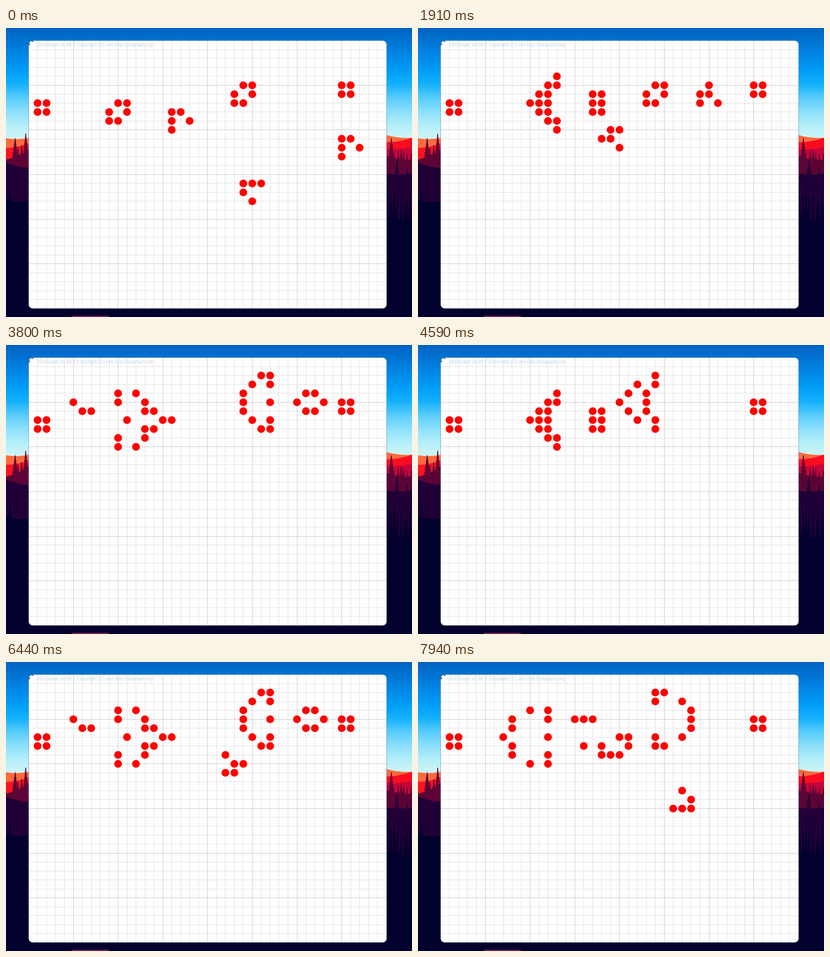
These frames come from a looping animation (886x632 px, 8 s). An HTML page with a canvas:

```html
<!DOCTYPE html>
<html lang="en">
<head>
<meta charset="utf-8">
<title>Glider gun</title>
<style>
html, body { margin: 0; width: 100%; height: 100%; overflow: hidden; background: #02002c; }
canvas { display: block; }
</style>
</head>
<body>
<canvas id="stage" width="886" height="632"></canvas>
<script>
const W = 886, H = 632, LOOP = 8000;
const BOARD = { x: 49.4, y: 27.6, w: 781.3, h: 585.6, r: 8.6 };
const CELL = 19.52, COLS = 40, ROWS = 30, DOT = 8.5;
const NAVY = '#02002c', PURPLE = '#210038', FOREST = '#5c0435';

const BLOCK = 'OO/OO', SHIP = '.OO/O.O/OO.', GLIDER = 'OO./O.O/O..', TURNED = 'OOO/O../.O.';
const SEED = [
  [BLOCK, 1, 7], [BLOCK, 35, 5], [SHIP, 9, 7], [SHIP, 23, 5],
  [GLIDER, 16, 8], [GLIDER, 35, 11], [TURNED, 24, 16]
];

// The pace wavers slightly: [ms, generation].
const PACE = [
  [0, 0], [1720, 21], [1910, 23], [2650, 31], [3070, 36], [3510, 41],
  [4340, 50], [5170, 60], [5990, 69], [7040, 81], [7940, 91], [8030, 92]
];

const ctx = document.getElementById('stage').getContext('2d');

function seedCells() {
  const cells = new Uint8Array(COLS * ROWS);
  for (const [shape, x, y] of SEED)
    shape.split('/').forEach((row, j) => [...row].forEach((ch, i) => {
      if (ch === 'O') cells[(y + j) * COLS + x + i] = 1;
    }));
  return cells;
}

function nextGeneration(cells) {
  const at = (x, y) => x >= 0 && x < COLS && y >= 0 && y < ROWS ? cells[y * COLS + x] : 0;
  return cells.map((live, k) => {
    const x = k % COLS, y = Math.floor(k / COLS);
    let n = -live;
    for (let j = -1; j <= 1; j++) for (let i = -1; i <= 1; i++) n += at(x + i, y + j);
    return n === 3 || (live && n === 2) ? 1 : 0;
  });
}

function generationAt(t) {
  const k = PACE.findIndex(([ms]) => ms > t);
  const [t0, g0] = PACE[k - 1], [t1, g1] = PACE[k];
  return Math.floor(g0 + (t - t0) / (t1 - t0) * (g1 - g0) + 1e-6);
}

function seededRandom(seed) {
  return () => (seed = (seed * 16807) % 2147483647) / 2147483647;
}

function pine(c, x, top, height, width, color) {
  const tiers = 9, step = height / tiers;
  c.fillStyle = color;
  c.beginPath();
  c.rect(x - 1, top, 2, height);
  for (let i = 0; i < tiers; i++) {
    const half = width / 2 * (i + 1.5) / tiers, y = top + i * step;
    c.moveTo(x, y - step * 0.4);
    c.lineTo(x + half, y + step * 1.2);
    c.lineTo(x - half, y + step * 1.2);
  }
  c.fill();
}

// A sloping layer from x0 to x1, reaching to the bottom of the stage.
function ridge(c, x0, x1, y0, y1, color) {
  c.fillStyle = color;
  c.beginPath();
  c.moveTo(x0, y0);
  c.quadraticCurveTo((x0 + x1) / 2, (y0 + y1) / 2 + 5, x1, y1);
  c.lineTo(x1, H);
  c.lineTo(x0, H);
  c.fill();
}

function grove(c, x0, x1, top, depth, color, seed) {
  const rnd = seededRandom(seed);
  for (let x = x0; x < x1; x += 7)
    pine(c, x + rnd() * 4, top + rnd() * depth * 0.5, depth, 11, color);
}

function paintLandscape(c) {
  const sky = c.createLinearGradient(0, 0, 0, 245);
  ['#0062c0', '#0074d4', '#0088e6', '#009cf6', '#14b0fd', '#58ccfb', '#8ee0fb', '#b4eff9', '#d2f6f4']
    .forEach((color, i, all) => sky.addColorStop(i / (all.length - 1), color));
  c.fillStyle = sky;
  c.fillRect(0, 0, W, 250);

  const left = (y0, y1, color) => ridge(c, 0, 50, y0, y1, color);
  left(241, 240, '#ff6a3c');
  left(262, 252, '#fa1420');
  left(288, 266, FOREST);
  grove(c, 26, 52, 256, 30, FOREST, 11);
  pine(c, 20, 242, 56, 22, FOREST);
  pine(c, 43, 232, 66, 20, FOREST);
  left(294, 306, PURPLE);
  left(376, 379, NAVY);
  pine(c, 9, 349, 34, 13, NAVY);

  const right = (y0, y1, color) => ridge(c, 830, W, y0, y1, color);
  right(234, 240, '#ff6a3c');
  right(250, 240, '#fa0c20');
  right(264, 260, '#c4063a');
  right(280, 288, FOREST);
  grove(c, 846, W, 266, 30, FOREST, 5);
  pine(c, 841, 242, 60, 22, FOREST);
  right(318, 318, PURPLE);
  pine(c, 853, 289, 60, 22, PURPLE);
  pine(c, 875, 306, 50, 18, PURPLE);
  right(412, 424, NAVY);
  grove(c, 832, W, 348, 76, NAVY, 23);

  c.fillStyle = '#70204e';
  c.beginPath();
  c.roundRect(141.5, 629.3, 85, 12, 5);
  c.fill();
}

function paintBoard(c) {
  const { x, y, w, h, r } = BOARD;
  c.save();
  c.beginPath();
  c.roundRect(x, y, w, h, r);
  c.fillStyle = '#fefefe';
  c.fill();
  c.clip();
  for (const major of [false, true]) {
    c.strokeStyle = major ? '#c6c6c6' : '#dfdfdf';
    c.beginPath();
    for (let i = 1; i < COLS; i++) {
      if ((i % 5 === 0) !== major) continue;
      const px = Math.floor(x + i * CELL) + 0.5, py = Math.floor(y + i * CELL) + 0.5;
      c.moveTo(px, y);
      c.lineTo(px, y + h);
      c.moveTo(x, py);
      c.lineTo(x + w, py);
    }
    c.stroke();
  }
  // tips of the two axis arrows
  c.fillStyle = '#555';
  c.fill(new Path2D('M49 38L50 31L53 37ZM54 28H60L59 31Z'));
  c.restore();
  c.strokeStyle = '#356aa0';
  c.lineWidth = 0.6;
  c.beginPath();
  c.roundRect(x, y, w, h, r);
  c.stroke();

  c.fillStyle = '#c3d5e6';
  c.font = '10.32px "Liberation Sans", Arial, sans-serif';
  c.fillText('JSXGraph v0.99.7 Copyright (C) see http://jsxgraph.org', 67, 40);
}

function paintCells(cells) {
  ctx.fillStyle = '#ff0000';
  ctx.beginPath();
  cells.forEach((live, k) => {
    if (!live) return;
    const x = BOARD.x + (k % COLS) * CELL, y = BOARD.y + Math.floor(k / COLS) * CELL;
    ctx.moveTo(x + DOT, y);
    ctx.arc(x, y, DOT, 0, Math.PI * 2);
  });
  ctx.fill();
}

const backdrop = document.createElement('canvas');
backdrop.width = W;
backdrop.height = H;
const back = backdrop.getContext('2d');
back.fillStyle = NAVY;
back.fillRect(0, 0, W, H);
paintLandscape(back);
paintBoard(back);

const generations = [seedCells()];
while (generations.length <= generationAt(LOOP - 1))
  generations.push(nextGeneration(generations[generations.length - 1]));

const start = performance.now();

function frame() {
  const t = (performance.now() - start) % LOOP;
  ctx.drawImage(backdrop, 0, 0);
  paintCells(generations[generationAt(t)]);
  requestAnimationFrame(frame);
}
frame();
</script>
</body>
</html>
```
